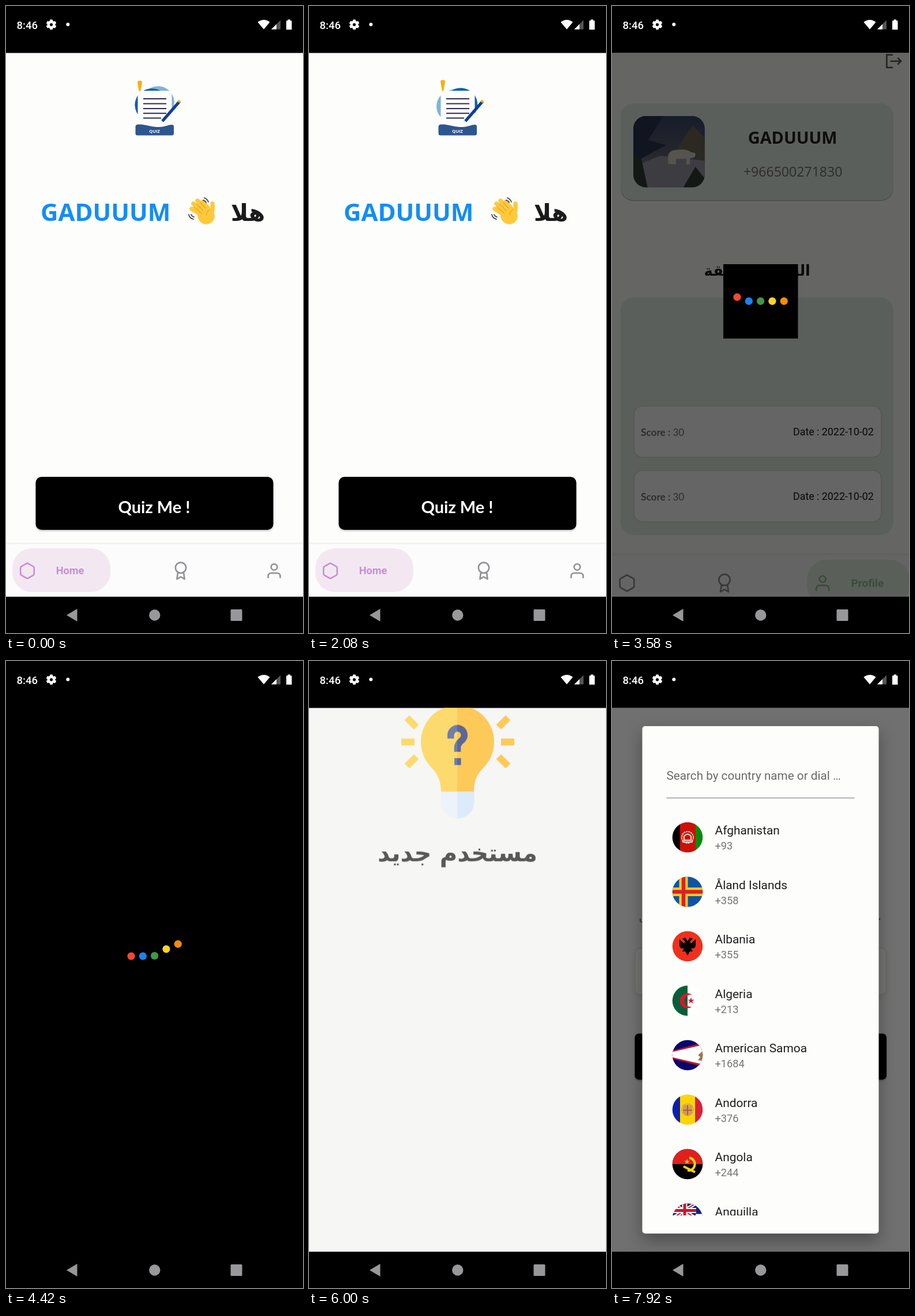
An HTML page that plays this animation: 515 by 1088 pixels, repeating every 8 s.

```html
<!DOCTYPE html>
<html lang="en">
<head>
<meta charset="utf-8">
<title>Quiz app</title>
<style>
html, body { margin: 0; width: 100%; height: 100%; overflow: hidden; background: #000; }
svg { display: block; width: 100vw; height: 100vh; }
text { font-family: Roboto, sans-serif; }
.mid { text-anchor: middle; }
.bold { font-weight: 700; }
.ar { font-family: "DejaVu Sans", sans-serif; }
.os { font-family: "Open Sans", sans-serif; }
.lato { font-family: Lato, sans-serif; font-weight: 700; }
.line { fill: none; stroke: currentColor; stroke-width: 2; stroke-linecap: round; stroke-linejoin: round; }
.soft { filter: drop-shadow(0 2px 1.5px rgba(0,0,0,.22)); }
</style>
</head>
<body>
<svg viewBox="0 0 515 1088">
<defs>
  <clipPath id="screen"><rect y="81.500" width="515" height="943.500"/></clipPath>
  <clipPath id="photo"><rect x="47.500" y="208" width="118" height="118" rx="21"/></clipPath>
  <clipPath id="round"><circle r="26.300"/></clipPath>
  <clipPath id="list"><rect x="53" y="250" width="409" height="712"/></clipPath>
  <linearGradient id="glass" gradientUnits="userSpaceOnUse" x1="194" x2="321" y1="0" y2="0">
    <stop offset=".5" stop-color="#ffd03b"/><stop offset=".5" stop-color="#ffb820"/>
  </linearGradient>
  <linearGradient id="cap" gradientUnits="userSpaceOnUse" x1="194" x2="321" y1="0" y2="0">
    <stop offset=".5" stop-color="#e8f1fd"/><stop offset=".5" stop-color="#d2e6fb"/>
  </linearGradient>
  <linearGradient id="ink" gradientUnits="userSpaceOnUse" x1="194" x2="321" y1="0" y2="0">
    <stop offset=".5" stop-color="#3d5291"/><stop offset=".5" stop-color="#243272"/>
  </linearGradient>
  <linearGradient id="hill" x2="0" y2="1">
    <stop offset="0" stop-color="#39476c"/><stop offset=".5" stop-color="#5d6071"/><stop offset="1" stop-color="#8f8a94"/>
  </linearGradient>
</defs>

<rect width="515" height="1088"/>

<g clip-path="url(#screen)">
  <g id="app">
    <rect y="81" width="515" height="944" fill="#fdfdfc"/>

    <g id="home">
      <ellipse id="blobA" cx="6" rx="31" ry="29" fill="#7fb3da"/>
      <ellipse id="blobB" cx="5" rx="30" ry="29" fill="#0b60a9"/>
      <path id="bang" fill="#fbae0a" d="M228 132q0-3 4-3t4 3l-3 17h-2z M230.300 153a1.700 1.700 0 1 1 3.400 0a1.700 1.700 0 1 1-3.400 0"/>
      <path d="M228.500 153q0-6 6-6h45q8 0 8 8v53h-59z" fill="#fdfdfc"/>
      <path d="M238 161h40m-40 8.500h40m-40 8.500h40m-40 8.300h40m-40 8.300h31" stroke="#2e2b4d" stroke-width="2"/>
      <path d="M271 200L301 165.500" stroke="#0d3e96" stroke-width="5"/>
      <path d="M299 167l2.500-3" stroke="#fbae0a" stroke-width="5"/>
      <path d="M267.500 204l1.800-5.700 3.700 3.300z" fill="#e9eef5"/>
      <path d="M224.500 209q0-3 4-3.500c14-1 22 5 38 4.500 10-.3 14-4 21-4q3.500 0 3.500 3v12q0 3.500-3.500 3.500h-59.500q-3.500 0-3.500-3.500z" fill="#2d568f"/>
      <text class="mid bold os" x="257.500" y="220" font-size="7.500" fill="#fff">QUIZ</text>

      <text class="os bold" x="60" y="373" font-size="42" fill="#148df5">GADUUUM</text>
      <g stroke-linecap="round" fill="none">
        <path d="M345 360L325 343M349 355L332 338M353 354L341 340M342 364L322 352M353 363Q360 356 358 343" stroke="#ffc93a" stroke-width="7.500"/>
        <ellipse cx="347" cy="364" rx="15" ry="14.500" fill="#ffc93a" transform="rotate(35 347 364)"/>
        <path d="M339 360L325 348M342 355L330 343M346 351L337 341M354 353q-7 4-6 10" stroke="#e9a126" stroke-width="1.200"/>
        <path d="M344 333q5 2 7 7M342 337q4 1 5 4M317 362q1 6 8 8M321 362q1 3 5 4" stroke="#56595c" stroke-width="2"/>
      </g>
      <text class="ar bold mid" x="419.500" y="373" font-size="41" fill="#1b1b1d">هلا</text>

      <rect class="soft" x="51.500" y="817" width="412" height="92" rx="10"/>
      <text class="lato mid" x="257" y="880" font-size="29" fill="#fff">Quiz Me !</text>
    </g>

    <g id="profile">
      <path d="M476 107H466V128H476M472 117.500H489M484 112l5.500 5.500-5.500 5.500" fill="none" stroke="#555" stroke-width="2.400"/>
      <rect x="26.500" y="188.500" width="450.500" height="160" rx="21" fill="#a9b3ab"/>
      <rect x="26.500" y="187.300" width="450.500" height="160" rx="21" fill="#e4efe6"/>
      <g clip-path="url(#photo)">
        <rect x="47" y="208" width="119" height="119" fill="url(#hill)"/>
        <path d="M47 208h50l-25 40 30 8-55 30z" fill="#2b3450"/>
        <path d="M120 262l25-38 21 20v40z" fill="#6d6656"/>
        <path d="M47 292l45-18 74 8v44H47z" fill="#9a96a3"/>
        <path d="M47 270l14 10 10 46H47zM130 326l20-34 16 20v14z" fill="#303c33"/>
        <path d="M105 287V273q2-8 14-9 17-2 24 4l6 1q3 5-2 8l-6 1v10h-6v-9h-17v9z" fill="#d9d3c6"/>
      </g>
      <text class="os bold mid" x="310.500" y="254" font-size="27.500" fill="#202020">GADUUUM</text>
      <text class="os mid" x="311" y="308" font-size="22" font-weight="500" fill="#6c6c6c">+966500271830</text>
      <text class="ar bold mid" x="252" y="472" font-size="24.500" fill="#1b1b1d">النتائج السابقة</text>
      <rect x="26.500" y="508" width="450.500" height="392.500" rx="21" fill="#e4efe6"/>
      <g id="rows"></g>
    </g>

    <g id="nav">
      <rect y="931" width="515" height="94" fill="#fdfcfc"/>
      <rect y="931" width="515" height="3" fill="#f3f4ea"/>
      <rect id="pillA" x="11" y="941" height="76" rx="34" fill="#f3e8f2"/>
      <rect id="pillB" y="941" height="76" rx="34" fill="#e3efe3"/>
      <g id="tabA"><path class="line" d="M21 16V8a2 2 0 0 0-1-1.730l-7-4a2 2 0 0 0-2 0l-7 4A2 2 0 0 0 3 8v8a2 2 0 0 0 1 1.730l7 4a2 2 0 0 0 2 0l7-4A2 2 0 0 0 21 16z"/></g>
      <g id="tabM" color="#909094"><path class="line" d="M8.210 13.890L7 23l5-3 5 3-1.210-9.120M5 8a7 7 0 1 1 14 0a7 7 0 1 1-14 0"/></g>
      <g id="tabB"><path class="line" d="M20 21v-2a4 4 0 0 0-4-4H8a4 4 0 0 0-4 4v2M8 7a4 4 0 1 1 8 0a4 4 0 1 1-8 0"/></g>
      <text id="labelA" class="mid bold" x="111" y="986" font-size="18.200" fill="#c68fd6">Home</text>
      <text id="labelB" class="mid bold" y="986" font-size="18.200" fill="#91bd93">Profile</text>
    </g>
  </g>

  <rect id="scrim" y="81" width="515" height="944"/>

  <g id="loader"><rect x="193" y="448" width="129.500" height="129"/></g>

  <g id="signup">
    <rect y="81" width="515" height="944" fill="#f6f6f4"/>
    <g id="intro">
      <path fill="url(#glass)" d="M229 272C229 251 223 241 213 230A63.500 63.500 0 1 1 302 230C292 241 286 251 286 272z"/>
      <path fill="url(#cap)" d="M229 271h57.500v18a28.750 28.750 0 0 1-57.500 0z"/>
      <path d="M245.800 179V173a11.750 11.750 0 1 1 20 8.300Q257.500 188 257.500 194V202" fill="none" stroke="url(#ink)" stroke-width="11.500"/>
      <path d="M252 213h11.500v12h-11.500z" fill="url(#ink)"/>
      <g id="rays"></g>
      <text class="ar bold mid" x="257.500" y="392" font-size="41.500" fill="#1d1d1f">مستخدم جديد</text>
    </g>
    <text id="hint" class="ar mid" x="257" y="449" font-size="19.200" fill="#626262">من فضلك أدخل رقم الجوال سنرسل لك كود التحقق.</text>
    <g id="login">
      <text class="ar mid" x="291" y="765" font-size="16.500" fill="#6e6e6e">لديك حساب بالفعل</text>
      <text class="ar bold mid" x="185" y="769" font-size="26" fill="#6e6e6e">دخول</text>
    </g>
    <g id="field">
      <rect x="40" y="498" width="435.500" height="81" rx="9" fill="#fdfdfc" stroke="#dde0e8" stroke-width="1.400" style="filter:drop-shadow(0 6px 6px rgba(0,0,0,.06))"/>
      <rect x="60.500" y="524.500" width="42" height="28" fill="#0a6638"/>
      <path d="M71 534q2 4 4 0t4 0 4 0 4 0 4 0M72 538h19M74 533v5M79 532v6M85 532v6M90 533v5" fill="none" stroke="#e8f2ec" stroke-width="1.200"/>
      <path d="M74 545h15" stroke="#e8f2ec"/>
      <text x="118" y="545.500" font-size="18.300" font-weight="500">+966</text>
      <text x="201" y="546.500" font-size="21" fill="#158ce8">50 027 1830</text>
    </g>
    <g id="button">
      <rect class="soft" x="39.500" y="646.400" width="436.500" height="80" rx="7"/>
      <text class="ar bold mid" direction="rtl" x="258" y="694" font-size="15.500" fill="#fff">طلب رمز OTP</text>
    </g>
  </g>

  <g id="dialog">
    <rect y="81" width="515" height="944" fill-opacity=".54"/>
    <rect x="52.500" y="113" width="410" height="880.500" rx="5" fill="#fdfdfc" style="filter:drop-shadow(0 12px 14px rgba(0,0,0,.32))"/>
    <text x="94.500" y="206" font-size="20.700" fill="#6a6a6a">Search by country name or dial …</text>
    <path d="M94.500 237.700H420.500" stroke="#8a8a8a" stroke-width="1.300"/>
    <g id="countries" clip-path="url(#list)"></g>
  </g>
</g>

<g fill="#fff">
  <text x="18.500" y="39.500" font-size="18.500" font-weight="500">8:46</text>
  <g id="gear"></g>
  <circle cx="107.300" cy="32" r="3"/>
  <path d="M436.500 28Q447 20 457.500 28L447 40.500z"/>
  <path d="M476 24.500V40.500H460z" fill="#555"/>
  <path d="M469 31.500V40.500H460z"/>
  <path d="M488.500 23.500h4.500v2h2.500v15.500h-9.500v-15.500h2.500z"/>
</g>
<g fill="#98989a">
  <path d="M105 1057L123.500 1046V1068z"/>
  <circle cx="257.800" cy="1057" r="9.700"/>
  <rect x="389.500" y="1047" width="20" height="20" rx="1.500"/>
</g>
</svg>

<script>
const $ = id => document.getElementById(id);
const clamp = x => Math.max(0, Math.min(1, x));
const show = (id, on) => { $(id).style.display = on ? '' : 'none'; };
const set = (id, attrs) => { for (const k in attrs) $(id).setAttribute(k, attrs[k]); };
const bar = (x, w, color) => `<rect x="${x}" y="-27" width="${w}" height="54" fill="${color}"/>`;
const star = (x, y, r) => 'M' + [0, 1, 2, 3, 4].map(i => {
  const a = i * 4 * Math.PI / 5 - Math.PI / 2;
  return `${x + r * Math.cos(a)} ${y + r * Math.sin(a)}`;
}).join('L') + 'z';

// Flags are drawn around their centre and clipped to a circle.
const crest = (color, r) => `<circle r="${r}" fill="none" stroke="${color}" stroke-width="2" stroke-dasharray="3 1"/>`;
const countries = [
  ['Afghanistan', '+93', bar(-27, 14, '#000') + bar(-13, 27, '#cc1109') + bar(14, 13, '#078a0c') +
    crest('#f3d9c8', 10) + '<path d="M-6 5V-2Q0-9 6-2V5zM-9 8H9" fill="none" stroke="#f3d9c8" stroke-width="2"/>'],
  ['Åland Islands', '+358', bar(-27, 54, '#0d55a4') +
    '<path d="M-7-27V27M-27 0H27" stroke="#fccb10" stroke-width="15"/><path d="M-7-27V27M-27 0H27" stroke="#d8202f" stroke-width="6.5"/>'],
  ['Albania', '+355', bar(-27, 54, '#f0301c') +
    '<path d="M0-9L-4-15-9-13-4-8-6-5-14-12-14 0-11 4-6 3-9 9-4 9 0 16 4 9 9 9 6 3 11 4 14 0 14-12 6-5 4-8 9-13 4-15z"/>'],
  ['Algeria', '+213', bar(-27, 27, '#05603a') + bar(0, 27, '#fff') +
    `<path d="M8-10A13 13 0 1 0 8 10A10.500 10.500 0 1 1 8-10z${star(6, 0, 6)}" fill="#d8152d"/>`],
  ['American Samoa', '+1684', bar(-27, 54, '#06066b') +
    '<path d="M-34-6L27-22V20L-34 4z" fill="#c8142b"/><path d="M-34-4L27-18V16L-34 2z" fill="#fff"/>' +
    '<path d="M27-8L18 0 22 3 18 9 27 10z" fill="#a1794c"/>'],
  ['Andorra', '+376', bar(-27, 14, '#0a1fb5') + bar(-13, 26, '#fdd405') + bar(13, 14, '#d9213b') +
    '<path d="M-8-8H8V5Q6 10 0 11Q-6 10-8 5z" fill="#d79a55"/><path d="M0-8V10M-8 1H8" stroke="#b05b45" stroke-width="2"/>' + crest('#c8a25c', 10)],
  ['Angola', '+244', bar(-27, 54, '#000') + '<rect x="-27" y="-27" width="54" height="27" fill="#e0201f"/>' +
    `<path d="M3-11A11 11 0 0 1 0 11M-7 4L13 14" fill="none" stroke="#fbd416" stroke-width="4"/><path d="${star(-1, -4, 5)}" fill="#fbd416"/>`],
  ['Anguilla', '+1264', bar(-27, 54, '#05247d') +
    '<path d="M-27-27L15 0M15-27L-27 0" stroke="#fff" stroke-width="6"/><path d="M-27-27L15 0M15-27L-27 0" stroke="#cf142b" stroke-width="2"/>' +
    '<path d="M-5-27V0M-27-14H15" stroke="#fff" stroke-width="9"/><path d="M-5-27V0M-27-14H15" stroke="#cf142b" stroke-width="5"/>' +
    '<path d="M14-8H26V12L20 16 14 12z" fill="#fff"/>']
];
$('countries').innerHTML = countries.map(([name, code, flag], i) => `
  <g transform="translate(0 ${i * 94.5})">
    <g transform="translate(131 306)"><g clip-path="url(#round)">${flag}</g></g>
    <text x="178.500" y="301" font-size="20.900" fill="#1e1e1e">${name}</text>
    <text x="178.500" y="327" font-size="18.200" fill="#757575">${code}</text>
  </g>`).join('');

$('rows').innerHTML = [0, 106.7].map(y => `
  <g transform="translate(0 ${y})">
    <rect x="48.500" y="687.300" width="408.500" height="84.700" rx="14" fill="#fcfdfc" stroke="#c3cfc5"/>
    <text class="lato" x="60" y="737" font-size="16.300" fill="#727272">Score : <tspan font-weight="400">30</tspan></text>
    <text x="311.300" y="735.500" font-size="17" fill="#151515">Date : 2022-10-02</text>
  </g>`).join('');

$('rays').innerHTML = [[171.5, 185, 0], [178, 151, 45], [178, 218.5, -45], [344.5, 185, 0], [337, 151, -45], [337, 218.5, 45]]
  .map(([x, y, a]) => `<rect x="-11.500" y="-6" width="23" height="12" fill="${x < 257 ? '#ffd03b' : '#ffb820'}" transform="translate(${x} ${y}) rotate(${a})"/>`).join('');

$('gear').innerHTML = '<circle cx="78.500" cy="32.300" r="4.800" fill="none" stroke="#fff" stroke-width="4.400"/>' +
  [0, 60, 120, 180, 240, 300].map(a => `<rect x="76" y="23.500" width="5" height="4" rx="1" transform="rotate(${a} 78.500 32.300)"/>`).join('');

const dots = ['#f4492f', '#1a83ee', '#43964a', '#fdd32c', '#fb8c04'].map((color, i) => {
  const dot = document.createElementNS('http://www.w3.org/2000/svg', 'circle');
  dot.setAttribute('cx', 217 + i * 20.3);
  dot.setAttribute('r', 6.6);
  dot.setAttribute('fill', color);
  $('loader').append(dot);
  return dot;
});

const LOOP = 8000, PROFILE = 2250, LOADING = 3580, BLACK = 3740, SIGNUP = 5620, DIALOG = 7640;
const drops = { intro: 0, field: 400, hint: 600, button: 600, login: 800 };
const zoom = s => `translate(257.500 553) scale(${s}) translate(-257.500 -553)`;

function drawHome(t) {
  const turn = t * 0.0625;
  const spin = a => `translate(258 174) rotate(${a})`;
  set('blobA', { transform: spin(-50 - turn) });
  set('blobB', { transform: spin(200 + turn) });
  set('bang', { transform: `translate(0 ${0.5 - 1.5 * Math.abs(Math.sin(t / 500))})` });
}

function drawNav(t) {
  const k = clamp((t - 2170) / 330), p = k * k * (3 - 2 * k);
  const tab = x => `translate(${x - 15.72} 964.300) scale(1.310)`;
  const user = 465 - 105 * p;
  set('pillA', { width: 170 - 118 * p, opacity: 1 - p });
  set('pillB', { x: user - 26, width: 52 + 118 * p, opacity: p });
  set('tabA', { transform: tab(37), color: p < 0.5 ? '#c68fd6' : '#909094' });
  set('tabM', { transform: tab(303 - 105 * p) });
  set('tabB', { transform: tab(user), color: p < 0.5 ? '#909094' : '#91bd93' });
  set('labelA', { opacity: clamp(1 - 2 * p) });
  set('labelB', { x: user + 74, opacity: clamp(2 * p - 1) });
}

function drawLoader(t) {
  const rise = 709, gap = 156, cycle = 1400;
  dots.forEach((dot, i) => {
    const u = ((t - 3441 - i * gap) % cycle + cycle) % cycle / rise;
    dot.setAttribute('cy', 512.2 - (u < 1 ? 21 * Math.sin(Math.PI * u) ** 2 : 0));
  });
}

function drawSignup(t) {
  const enter = clamp((t - SIGNUP) / 300);
  set('signup', { transform: zoom(1 - 0.15 * (1 - enter) ** 4), opacity: clamp(enter * 8 - 1) });
  for (const id in drops) {
    const u = clamp((t - SIGNUP - drops[id]) / 800);
    set(id, { transform: `translate(0 ${-131 * (1 - u) ** 1.67})`, opacity: clamp(u / 0.65) });
  }
}

function draw(t) {
  show('app', t < BLACK);
  show('home', t < PROFILE);
  show('profile', t >= PROFILE);
  show('scrim', t >= LOADING);
  show('loader', t >= LOADING && t < SIGNUP + 300);
  show('signup', t >= SIGNUP);
  show('dialog', t >= DIALOG);
  set('app', { transform: zoom(t < LOADING ? 1 : 1.05) });
  set('scrim', { opacity: t < BLACK ? 0.6 : 1 });
  set('dialog', { opacity: clamp((t - DIALOG) / 180) });
  drawHome(t);
  drawNav(t);
  drawLoader(t);
  drawSignup(t);
}

const start = performance.now();
function tick() {
  draw((performance.now() - start) % LOOP);
  requestAnimationFrame(tick);
}
tick();
</script>
</body>
</html>
```
